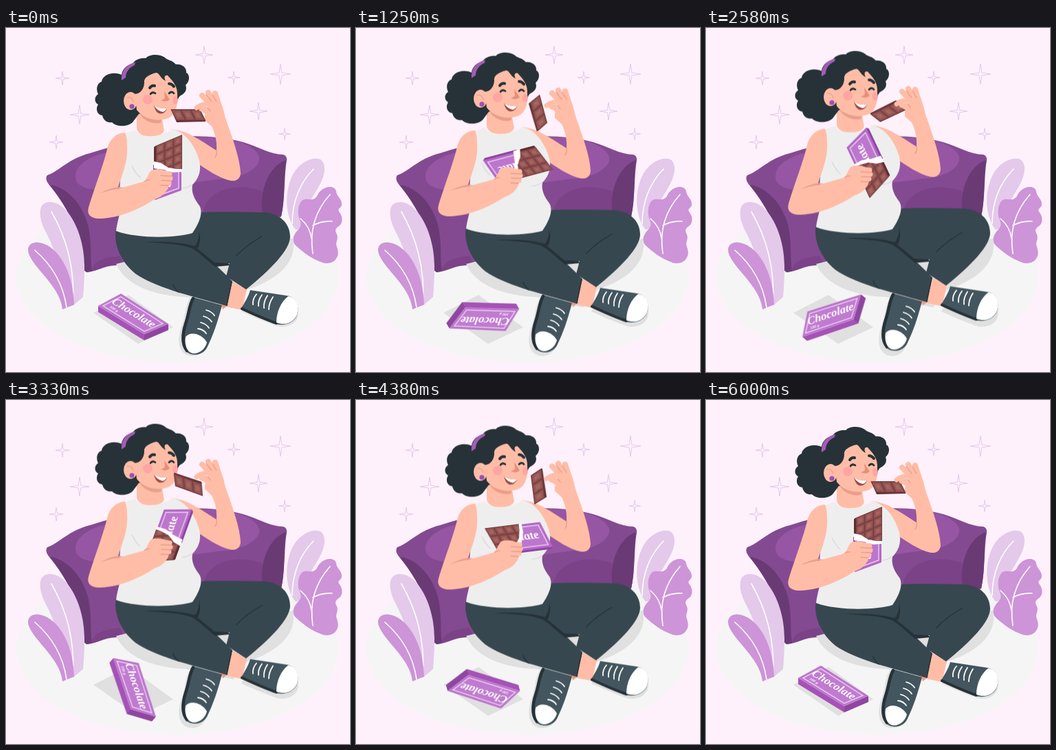
An HTML page that plays this animation: 500 by 500 pixels, repeating every 6.04 s.

```html
<!DOCTYPE html>
<html lang="en">
<head>
<meta charset="utf-8">
<title>Chocolate break</title>
<style>
html, body { margin: 0; width: 100%; height: 100%; overflow: hidden; background: #fef1fb; }
svg { display: block; width: 100vw; height: 100vh; }
text { font: italic bold 17px "Liberation Serif", "Noto Serif", serif; fill: #fff; }
.line { fill: none; stroke-linecap: round; stroke-linejoin: round; }
.skin { fill: #ffbda7; }
.finger { stroke: #ffbda7; stroke-width: 8; }
.crease { stroke: #e99f8a; stroke-width: 1.3; }
.vein { stroke: #fff; stroke-width: 1.6; }
.lace { stroke: #fff; stroke-width: 1.8; }
.dark { fill: #263238; }
.pants { fill: #37474f; }
.shade { fill: #e0e0e0; }
.cells { fill: none; stroke: #975653; stroke-width: .8; stroke-dasharray: .8 .2; }
.shine { fill: none; stroke: #a46661; stroke-width: .42; stroke-dasharray: .42 .58; }

/* Whole cycles fill 6 s, followed by a 40 ms rest. */
.woman, .held, .piece, .box { animation: 6.04s linear infinite; }
.woman { animation-name: float; }
.held { animation-name: turn; transform-origin: 236px 202px; }
.piece { animation-name: turn; transform-origin: 265px 127px; }
.box { animation-name: turn-twice; transform-origin: 185px 420px; }
@keyframes float {
  0%, 24.834%, 49.669%, 74.503%, 99.338%, 100% { transform: translateY(0); }
  12.417%, 37.252%, 62.086%, 86.921% { transform: translateY(-10px); }
}
@keyframes turn { 99.338%, 100% { transform: rotate(360deg); } }
@keyframes turn-twice { 99.338%, 100% { transform: rotate(720deg); } }
</style>
</head>
<body>
<svg viewBox="0 0 500 500">
  <defs>
    <path id="star" d="M0-1L.13-.13 1 0 .13.13 0 1-.13.13-1 0-.13-.13Z" vector-effect="non-scaling-stroke"/>
    <path id="shoeL" d="M271 391L314 403C308 426 301 447 292 465C286 476 270 478 262 470C253 462 254 445 260 430C265 415 264 402 271 391Z"/>
    <path id="shoeR" d="M355 381L408 389C422 391 428 404 422 420C415 431 402 433 392 430C375 424 358 417 341 409C346 400 352 392 355 381Z"/>
    <clipPath id="wrapClip"><path d="M217 200L255 206V236L217 250Z"/></clipPath>
  </defs>

  <rect width="500" height="500" fill="#fef1fb"/>
  <ellipse cx="249" cy="362" rx="234" ry="125" fill="#f5f5f5"/>

  <g fill="none" stroke="#e6caec" stroke-width="1">
    <use href="#star" transform="translate(82 73) scale(10)"/>
    <use href="#star" transform="translate(288 39) scale(13)"/>
    <use href="#star" transform="translate(331 72) scale(9)"/>
    <use href="#star" transform="translate(399 67) scale(15)"/>
    <use href="#star" transform="translate(107 126) scale(14)"/>
    <use href="#star" transform="translate(73 166) scale(10)"/>
    <use href="#star" transform="translate(367 121) scale(13)"/>
    <use href="#star" transform="translate(405 154) scale(8.5)"/>
  </g>

  <!-- plants on the right -->
  <path fill="#e4c9ea" d="M421 293C406 275 404 240 416 215C425 196 445 186 457 191C466 197 464 213 457 226C447 245 432 264 427 292Z"/>
  <path class="line vein" d="M447 205C429 223 416 250 416 284"/>
  <path fill="#cd94d8" d="M457 237C465 229 479 229 480 238C481 245 488 248 488 256C488 262 481 262 484 267C489 273 490 281 486 286C482 290 477 291 480 298C484 305 480 309 480 315C482 322 485 328 480 335C476 342 467 343 460 341C445 336 430 325 420 315C415 308 418 301 423 295C428 290 430 286 427 279C423 270 424 257 430 251C435 247 441 250 446 249C453 247 452 241 457 237Z"/>
  <path class="line vein" d="M471 242C453 262 440 290 446 328M446 287Q459 280 474 281M428 277Q442 289 444 306"/>

  <!-- cushion -->
  <path fill="#844a91" d="M60 214C78 208 90 190 122 182C200 156 290 150 345 166C365 172 385 184 403 184Q409 186 408 193C404 215 406 248 400 274L300 345H160C143 345 132 354 118 355Q112 354 112 340C110 300 90 262 66 232Q55 220 60 214Z"/>
  <path fill="#9656a3" d="M101 216C101 202 114 191 135 184L200 166V235H128C112 233 101 227 101 216Z"/>
  <path fill="#9656a3" d="M270 160C310 155 360 165 368 187C371 203 345 218 315 219L270 225Z"/>
  <path fill="#7b4288" d="M286 270C290 240 325 222 372 237L374 270Z"/>
  <path fill="#6a3a75" d="M65 228C90 232 113 258 120 290C125 315 122 335 125 353L118 355Q112 354 112 340C110 300 90 262 65 230Z"/>
  <path fill="#6a3a75" d="M407 192C384 199 367 235 373 270L400 274C406 248 403 217 407 192Z"/>
  <path fill="#7b4288" d="M125 353C126 338 145 333 165 331L172 345H160C145 344 137 351 125 353Z"/>

  <!-- plants on the left -->
  <path fill="#e4c9ea" d="M84 405C88 368 73 325 56 293C46 271 47 253 64 253C91 253 114 300 114 345C114 365 113 380 112 391L98 403Z"/>
  <path class="line vein" d="M66 267C87 303 101 350 97 401"/>
  <path fill="#cd94d8" d="M82 409C79 373 32 344 32 322C33 311 45 309 56 314C82 325 98 362 99 402Z"/>
  <path class="line vein" d="M42 323C65 343 83 371 88 406"/>

  <!-- ground shadows -->
  <g class="shade">
    <path d="M160 343C174 374 214 389 262 391L330 406L351 380C395 366 424 340 417 306L300 330L180 338Z"/>
    <use href="#shoeL" x="-4" y="2"/>
    <use href="#shoeR" x="1" y="3"/>
    <path d="M127 414L178 388L243 435L192 459Z"/>
  </g>

  <!-- boxed bar -->
  <g class="box">
    <path fill="#a552b6" d="M134 404V413L201 454V445Z"/>
    <path fill="#8f46a0" d="M201 445V454L236 439V430Z"/>
    <path fill="#bd76cd" d="M134 404L167 386L236 430L201 445Z"/>
    <path fill="#c07bd0" stroke="#e7c9ed" stroke-width="1.5" d="M141 404L167 390.500L228 429.500L201 441Z"/>
    <text text-anchor="middle" transform="matrix(.85 .52 -.6 .72 185 415)" y="4">Chocolate</text>
    <text transform="matrix(.85 .52 -.6 .68 150 406)" style="font-size:6px">100 g</text>
  </g>

  <g class="woman">
    <!-- far arm -->
    <path class="skin" d="M240 147C264 148 289 168 306 178C307 163 303 151 299 143L289 134C288 126 292 116 297 108L311 108C317 116 317 126 320 134C330 162 340 190 341 211Q340 223 327 222C309 218 292 206 276 195Z"/>
    <path class="line finger" d="M301 115L285 98M305 113L294 94M311 117L304 95"/>
    <path class="line crease" d="M306 178Q307 184 304 188M299 107L291 97M306 107L300 97"/>

    <!-- feet -->
    <path class="skin" d="M328 368L350 380L343 410L306 402Z"/>
    <path fill="#e99f8a" d="M312 398L324 402L315 409Z"/>
    <use href="#shoeL" fill="#43555e"/>
    <path class="line" stroke="#263238" stroke-width="4.500" d="M272 393C266 403 266 416 261 430C256 445 256 460 263 469"/>
    <path fill="#fff" d="M261 449C267 440 285 444 292 457C288 472 271 478 264 468Q259 460 261 449Z"/>
    <path class="line lace" d="M291 410Q299 412 303 418M287 419Q295 421 299 427M283 428Q291 430 295 436M279 437Q287 438 291 444"/>
    <use href="#shoeR" fill="#43555e"/>
    <path class="line" stroke="#263238" stroke-width="4" d="M343 408C360 416 375 423 393 429"/>
    <path fill="#fff" d="M410 390C422 391 428 404 422 419C415 431 402 432 393 428C393 412 400 398 410 390Z"/>
    <path class="line lace" d="M364 387Q358 394 359 402M372 388Q366 396 367 404M380 389Q374 398 375 407M388 391Q382 400 382 409"/>

    <!-- legs -->
    <path class="pants" d="M270 269C310 266 345 268 374 268C398 269 413 284 413 304C412 323 386 350 349 380L320 361L325 342L304 345L240 320Z"/>
    <path class="pants" d="M160 292C156 312 165 338 188 357C215 376 262 388 321 404L329 368C320 359 311 350 302 342L276 318L285 268Z"/>
    <path class="dark" d="M203 311C228 310 254 311 274 317L303 341L323 342L326 345L304 347C292 338 281 326 270 320C250 313 228 313 203 311ZM274 318Q281 309 281 296Q284 310 279 320Z"/>
    <path class="line" stroke="#263238" stroke-width="1.4" d="M372 303Q350 315 335 331M243 373Q245 379 251 384M321 403L328 369"/>

    <!-- neck and shirt -->
    <path class="skin" d="M190 110V145C190 154 202 159 213 158C224 157 232 152 229 145L226 125Z"/>
    <path fill="#e99f8a" d="M194 124C200 135 212 140 225 138L227 130Z"/>
    <path fill="#eeeeee" d="M171 154L187 148C194 160 222 161 242 147C260 151 275 170 281 193C285 211 277 222 271 228C269 239 274 249 281 258C286 266 284 279 271 298C250 305 192 307 160 295C163 273 172 257 165 237Z"/>
    <path class="line" stroke="#d8d8d8" stroke-width="1.2" d="M183 200Q187 210 195 217M270 228Q263 233 256 233"/>

    <!-- head -->
    <path class="dark" d="M168 68C154 62 140 69 139 78C131 81 131 91 134 96C127 101 129 109 134 111C129 119 134 127 140 127C142 137 151 138 154 137C160 144 177 144 184 137L193 125L246 112C250 105 250 99 256 97C262 93 263 88 261 83C268 77 267 67 262 65C263 55 252 52 247 53C241 46 234 47 231 43C223 37 208 38 203 44C194 43 187 47 184 52C175 54 169 60 168 68Z"/>
    <path class="skin" d="M187 96C196 96 201 87 201 79C200 71 211 67 218 65C223 65 224 73 232 77C229 71 231 68 235 69C242 77 250 84 249 99C250 116 245 129 233 132C216 137 198 130 190 119Z"/>
    <path fill="#a45bb6" d="M168 76C167 62 176 52 188 50L187 54C178 58 174 65 174 72Z"/>
    <ellipse class="skin" cx="181" cy="106" rx="10" ry="13"/>
    <path class="line crease" d="M176 101Q182 99 185 107"/>
    <circle cx="183" cy="114" r="3.600" fill="#9b51b0"/>
    <circle cx="206" cy="104" r="7" fill="#ff9fa2" opacity=".8"/>
    <ellipse cx="246" cy="105" rx="4" ry="6" fill="#ff9fa2" opacity=".8"/>
    <g class="line" stroke="#263238">
      <path stroke-width="4" d="M209 87Q212 83 216 84M237 81Q241 81 244 85"/>
      <path stroke-width="2.800" d="M210 96Q213 92 217 95M237 95Q241 91 244 95"/>
    </g>
    <path fill="#e58f79" d="M230 92L238 104Q232 109 225 105Q230 104 231 101Z"/>
    <path fill="#a34a45" d="M215 112Q224 119 234 116C233 122 228 126 222 124C218 122 216 117 215 112Z"/>
    <path fill="#fff" d="M215 112Q224 119 234 116Q232 121 228 122Q219 120 215 112Z"/>

    <!-- bite -->
    <g class="piece">
      <path fill="#5f2d31" d="M239.500 118L248 137L290 136V134L282 118Z"/>
      <g transform="matrix(14.1 .1 8 16.500 239.500 118)">
        <path fill="#7b4244" d="M0 0H3V1H0Z"/>
        <path class="cells" d="M.1 .5H3"/>
        <path class="shine" d="M.29 .5H3"/>
      </g>
    </g>
    <path class="line finger" style="stroke-width:7" d="M301 113C292 109 284 111 277 116M299 128C294 124 290 119 284 118"/>
    <path class="line crease" d="M289 116Q294 115 297 121"/>

    <!-- held bar -->
    <g class="held">
      <path fill="#5f2d31" d="M218 171L215 173V200H220Z"/>
      <g transform="matrix(12.67 -5.33 0 13 218 171)">
        <path fill="#7b4244" d="M0 0H3V4H0Z"/>
        <path class="cells" d="M.5 .1V4M1.5 .1V4M2.5 .1V4"/>
        <path class="shine" d="M.5 .29V4M1.5 .29V4M2.5 .29V4"/>
      </g>
      <path fill="#8f46a0" d="M214 199L217 200V250L214 247Z"/>
      <path fill="#b468c6" d="M217 200L255 206V236L217 250Z"/>
      <g clip-path="url(#wrapClip)">
        <path fill="#bd76cd" stroke="#ead0ef" stroke-width="1.4" d="M221 190H251V233L221 244Z"/>
        <text transform="matrix(0 1 -.92 .39 232 207)" style="font-size:18px">late</text>
      </g>
      <path fill="#fff" d="M215 194L225 196L236 203L247 205L256 205V209L243 210L230 206L215 204Z"/>
    </g>

    <!-- near arm -->
    <path class="skin" d="M173 152C158 153 150 164 147 176C142 198 128 234 120 261C117 272 124 277 137 277C166 276 194 263 216 249C228 245 236 236 237 227L240 211C230 206 220 204 211 207C207 211 205 219 201 223L162 234C168 215 178 194 176 171Q176 158 173 152Z"/>
    <path class="line finger" style="stroke-width:7" d="M220 211L238 212M220 217L239 218M221 224L237 225M220 231L232 232"/>
    <path class="line crease" d="M225 214.500L241 215.500M226 221.500L240 222M225 228.500L236 229M201 223Q206 220 209 221"/>
    <path fill="#e99f8a" d="M137 240Q150 233 163 231L171 232Q153 235 137 240Z"/>
  </g>
</svg>
</body>
</html>
```
